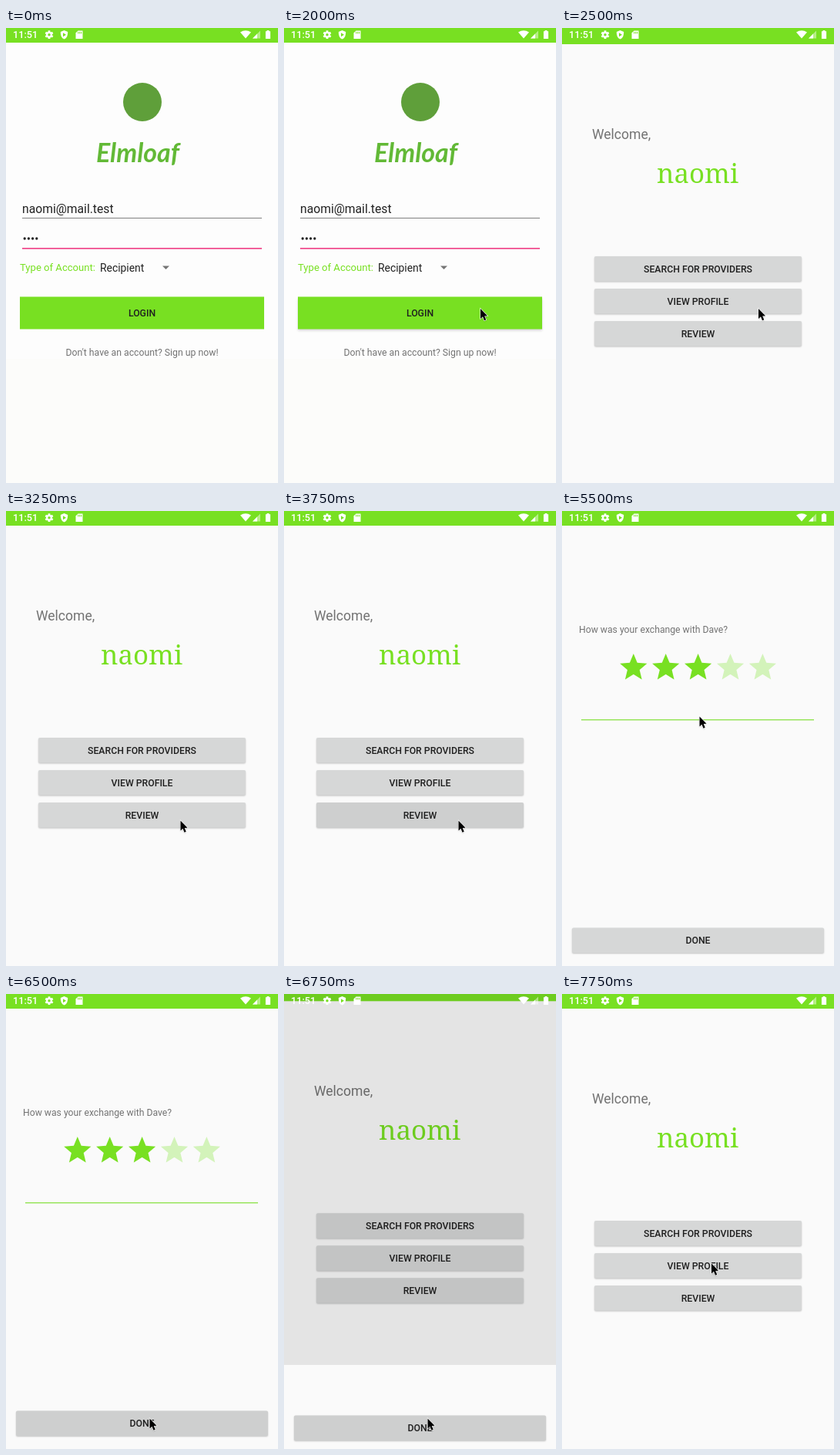
Write an HTML page with a canvas that moves like this. It is 353 px wide and 590 px high and loops after 8 s.

```html
<!DOCTYPE html>
<html lang="en">
<head>
<meta charset="utf-8">
<title>Food sharing app</title>
<style>
html, body { margin: 0; width: 100%; height: 100%; overflow: hidden; background: #fafafa; }
canvas { display: block; width: 353px; height: 590px; }
</style>
</head>
<body>
<canvas id="stage" width="353" height="590"></canvas>
<script>
const W = 353, H = 590, MID = 176.5, LOOP = 8000, STEP = 250, BAR = 19;
const GREEN = '#78e022', INK = '#1f1f1f', GREY = '#737373', WHITE = '#fff';
const ctx = document.getElementById('stage').getContext('2d');

function rect(x, y, w, h, color) {
  ctx.fillStyle = color;
  ctx.fillRect(x, y, w, h);
}

function circle(x, y, r, color) {
  ctx.fillStyle = color;
  ctx.beginPath();
  ctx.arc(x, y, r, 0, Math.PI * 2);
  ctx.fill();
}

function polygon(points, color) {
  ctx.fillStyle = color;
  ctx.beginPath();
  points.forEach(([x, y]) => ctx.lineTo(x, y));
  ctx.closePath();
  ctx.fill();
}

function text(str, x, y, size, color, { weight = 400, align = 'left', family = 'Roboto, sans-serif' } = {}) {
  ctx.font = `${weight} ${size}px ${family}`;
  ctx.textAlign = align;
  ctx.fillStyle = color;
  ctx.fillText(str, x, y);
}

function at(x, y, draw) {
  ctx.save();
  ctx.translate(x, y);
  draw();
  ctx.restore();
}

function withShadow(blur, offset, alpha, draw) {
  ctx.save();
  ctx.shadowColor = `rgba(0,0,0,${alpha})`;
  ctx.shadowBlur = blur;
  ctx.shadowOffsetY = offset;
  draw();
  ctx.restore();
}

function button(label, x, y, w, pressed) {
  withShadow(2, 1, 0.22, () => {
    ctx.fillStyle = pressed ? '#cecfcf' : '#d6d7d7';
    ctx.beginPath();
    ctx.roundRect(x, y, w, 32.5, 2);
    ctx.fill();
  });
  text(label, x + w / 2, y + 20.8, 12.25, INK, { weight: 500, align: 'center' });
}

function star(x, y, outer, inner, color) {
  const corners = Array.from({ length: 10 }, (_, i) => {
    const r = i % 2 ? inner : outer, a = i * Math.PI / 5;
    return [x + r * Math.sin(a), y - r * Math.cos(a)];
  });
  polygon(corners, color);
}

function background(color) {
  rect(0, -BAR, W, H + 2 * BAR, color);
  rect(0, -BAR, W, 2 * BAR, GREEN);
}

function gearIcon() {
  for (let i = 0; i < 6; i++) {
    rect(-1.4, -5.4, 2.8, 4, WHITE);
    ctx.rotate(Math.PI / 3);
  }
  circle(0, 0, 4, WHITE);
  circle(0, 0, 1.7, GREEN);
}

function shieldIcon() {
  ctx.fillStyle = WHITE;
  ctx.beginPath();
  ctx.moveTo(0, -5.7);
  ctx.lineTo(4.7, -3.7);
  ctx.quadraticCurveTo(5, 4, 0, 5.7);
  ctx.quadraticCurveTo(-5, 4, -4.7, -3.7);
  ctx.fill();
  polygon([[-1.5, -2.5], [2.5, 0], [-1.5, 2.5]], GREEN);
}

function cardIcon() {
  polygon([[-1.5, -5.3], [4.5, -5.3], [4.5, 5.3], [-4.5, 5.3], [-4.5, -2.3]], WHITE);
  for (let i = 0; i < 3; i++) rect(-1.8 + 2 * i, -3.8, 1, 2.5, GREEN);
}

function wifiIcon() {
  ctx.fillStyle = WHITE;
  ctx.beginPath();
  ctx.moveTo(0, 5);
  ctx.lineTo(-7, -3);
  ctx.quadraticCurveTo(0, -7.5, 7, -3);
  ctx.fill();
}

function signalIcon() {
  const wedge = (size, color) => polygon([[0, 0], [size, 0], [size, -size]], color);
  wedge(10, 'rgba(255,255,255,.45)');
  wedge(6, WHITE);
}

function batteryIcon() {
  rect(-1.4, -5.5, 2.8, 2, WHITE);
  rect(-3.1, -4.3, 6.2, 9.8, WHITE);
}

function statusIcons() {
  text('11:51', 9, 13.4, 12.7, WHITE, { weight: 500 });
  at(56, 8.7, gearIcon);
  at(75.5, 8.7, shieldIcon);
  at(95, 8.7, cardIcon);
  at(311, 8.5, wifiIcon);
  at(320, 13.5, signalIcon);
  at(340, 8.5, batteryIcon);
}

function login({ caret, pressed }) {
  background('#fdfdfd');
  rect(0, 429, W, H - 429, '#fcfcfa');
  circle(177, 96, 25, '#5f9f3a');
  text('Elmloaf', 171, 174, 34, '#62b936',
    { weight: 'italic 700', align: 'center', family: 'Lato, sans-serif' });

  text('naomi@mail.test', 21, 239.5, 15.7, '#222');
  rect(21, 246, 311, 1, '#808080');
  for (let i = 0; i < 4; i++) circle(24.2 + i * 5.2, 273, 1.65, '#222');
  if (caret) rect(42, 262, 2, 21, '#ff4081');
  rect(21, 285, 311, 1.7, '#f0478a');

  text('Type of Account:', 18, 315, 13.1, GREEN);
  text('Recipient', 122, 315.5, 13.9, '#222');
  polygon([[203, 308.5], [212, 308.5], [207.5, 313]], '#757575');

  withShadow(3, 2, pressed ? 0.15 : 0, () => rect(18, 348.5, 317, 42, GREEN));
  text('LOGIN', MID, 374.2, 12.25, INK, { weight: 500, align: 'center' });
  text("Don't have an account? Sign up now!", MID, 424.5, 12.25, GREY, { align: 'center' });
}

function welcome({ pressed } = {}) {
  background('#fafafa');
  text('Welcome,', 39, 142, 17.55, GREY);
  text('naomi', 176, 198.5, 34.8, GREEN, { align: 'center', family: '"Noto Serif", serif' });
  ['SEARCH FOR PROVIDERS', 'VIEW PROFILE', 'REVIEW'].forEach((label, i) =>
    button(label, 42, 294 + i * 42, 269, pressed && i === 2));
}

function rating({ stars = 0, pressed } = {}) {
  background('#fafafa');
  text('How was your exchange with Dave?', 22, 158, 12.2, GREY);
  for (let i = 0; i < 5; i++) {
    star(92.8 + i * 41.9, 203.5, 18.5, 8.3, i < stars ? GREEN : '#d3f3ba');
  }
  rect(25, 270, 302, 1.5, '#98e55c');
  button('DONE', 13, 540.5, 327, pressed);
}

// The upper screen slides by `drop` and shows only below `clip`; the lower one is raised and dimmed.
function stack(lower, upper, { lift = 0, shade = 0, clip, drop }) {
  at(0, -lift, lower);
  rect(0, 0, W, H, `rgba(0,0,0,${shade})`);
  ctx.save();
  ctx.beginPath();
  ctx.rect(0, clip, W, H - clip);
  ctx.clip();
  at(0, drop, upper);
  ctx.restore();
}

function screen(t) {
  if (t < 2500) {
    login({ caret: t < 2000 && t % 1000 >= 500, pressed: t >= 2000 });
  } else if (t < 2750) {
    stack(() => login({ pressed: true }), () => welcome(), { clip: 2, drop: 2 });
  } else if (t < 4000) {
    welcome({ pressed: t >= 3500 });
  } else if (t < 4250) {
    stack(() => welcome(), () => rating(), { lift: 11.5, shade: 0.09, clip: 9.5, drop: 1.7 });
  } else if (t < 6750) {
    rating({ stars: t >= 5000 ? 3 : 0, pressed: t >= 6500 });
  } else if (t < 7000) {
    stack(() => welcome(), () => rating({ stars: 3, pressed: true }),
      { lift: 9.7, shade: 0.09, clip: 481, drop: 6 });
  } else {
    at(0, t < 7250 ? -1 : 0, () => welcome());
  }
}

const POINTER_START = { x: 272, y: 366 };
const MOVES = [
  { start: 1000, end: 1500, x: 255, y: 364 },
  { start: 2500, end: 3250, x: 226.5, y: 401.5 },
  { start: 4000, end: 4500, x: 176, y: 205 },
  { start: 5000, end: 5500, x: 178.5, y: 266.5 },
  { start: 5750, end: 6250, x: 186.5, y: 550.5 },
  { start: 6750, end: 7750, x: 194, y: 349.5 }
];

function pointerAt(t) {
  return MOVES.reduce((from, { start, end, x, y }) => {
    const k = Math.min(1, Math.max(0, (t - start) / (end - start)));
    const eased = 1 - (1 - k) ** 3;
    return { x: from.x + (x - from.x) * eased, y: from.y + (y - from.y) * eased };
  }, POINTER_START);
}

function pointer(t) {
  if (t < MOVES[0].start) return;
  const { x, y } = pointerAt(t);
  const arrow = [[0, 0], [0, 13], [3, 10.3], [5, 15.2], [7.2, 14.3], [5.2, 9.5], [9, 9.2]];
  at(x, y, () => {
    withShadow(2, 1, 0.3, () => polygon(arrow, '#000'));
    ctx.lineWidth = 1.2;
    ctx.strokeStyle = WHITE;
    ctx.stroke();
    polygon(arrow, '#000');
  });
}

function frame(now) {
  const t = Math.floor((now % LOOP) / STEP) * STEP;
  screen(t);
  statusIcons();
  pointer(t);
  requestAnimationFrame(frame);
}

requestAnimationFrame(frame);
</script>
</body>
</html>
```
